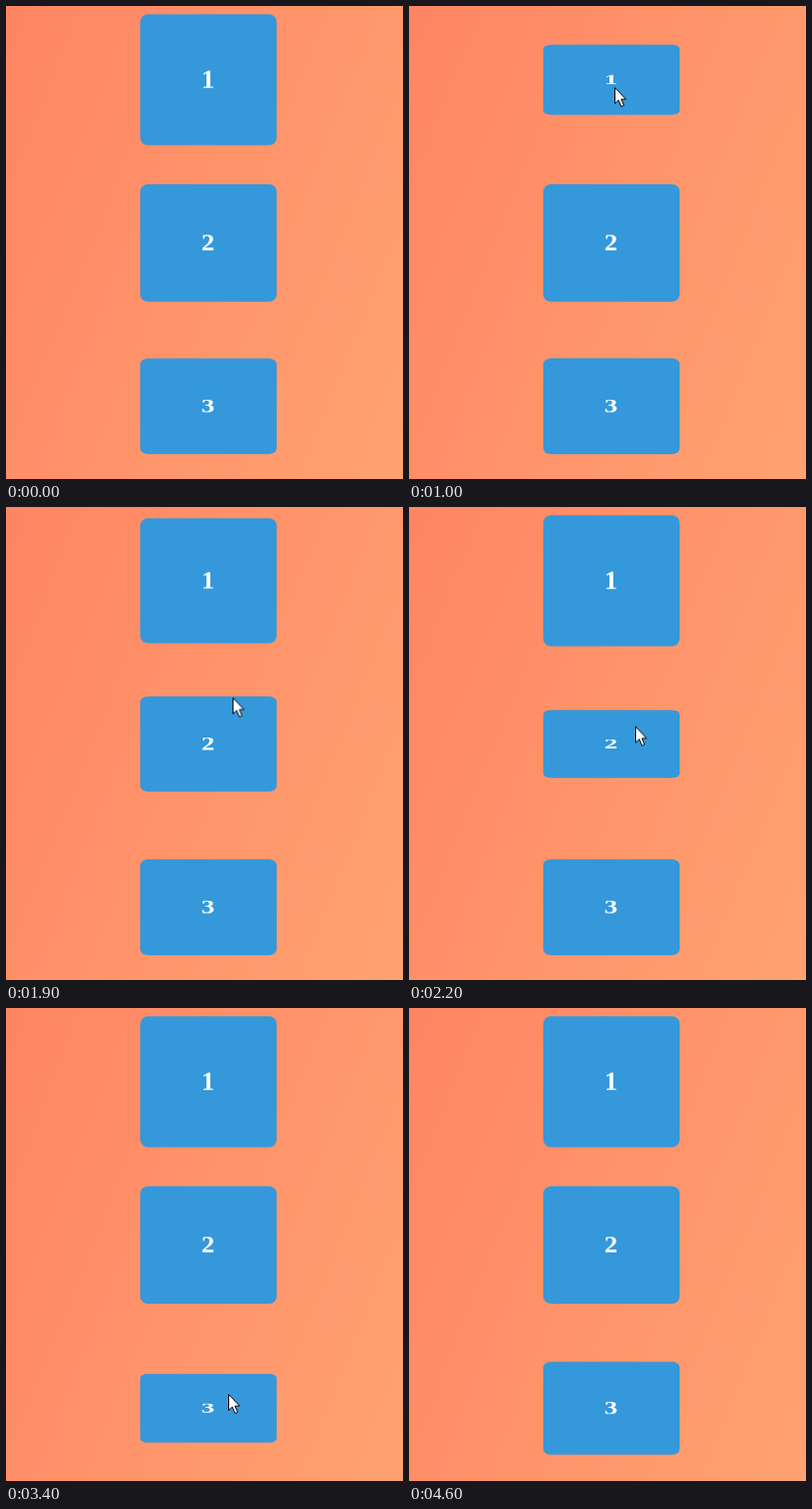
These frames come from a looping animation (402x478 px, 4700 ms). An HTML page:

```html
<!DOCTYPE html>
<html lang="en">
<head>
<meta charset="utf-8">
<title>Tilting cards</title>
<style>
  html, body {
    margin: 0;
    width: 100%;
    height: 100%;
    overflow: hidden;
  }
  body {
    position: relative;
    background: linear-gradient(112deg, #ff8563, #ffa271);
  }
  .card {
    position: absolute;
    left: 136px;
    top: calc(5.5px + 165px * var(--i));
    width: 138px;
    height: 137px;
    border-radius: 8px;
    background: #3498db;
    color: #fff;
    font: bold 27px/137px "Liberation Serif", serif;
    text-align: center;
    text-indent: -1px;
  }
  #pointer {
    position: absolute;
    left: 0;
    top: 0;
    overflow: visible;
  }
</style>
</head>
<body>
<div class="card" style="--i: 0">1</div>
<div class="card" style="--i: 1">2</div>
<div class="card" style="--i: 2">3</div>
<svg id="pointer" width="14" height="22">
  <path d="M.5 .5V16.6L4.2 13.2L6.9 19.6L9.6 18.4L6.9 12.2H11.6Z" fill="#fff" stroke="#000" stroke-linejoin="round"/>
</svg>
<script>
const LOOP = 4700;
const STEP = 100; // the picture advances ten times a second
const TILT = 400; // length of a hover transition
const HOVER_ANGLE = 60;

const animations = [];

function loop(element, keyframes, delay = 0) {
  const animation = element.animate(keyframes, { duration: LOOP, iterations: Infinity, delay });
  animation.pause();
  animations.push(animation);
}

const at = (time, props) => ({ offset: time / LOOP, ...props });
const tilt = angle => ({ transform: `rotateX(${angle}deg)`, easing: "ease" });

function hover(card, rest, enter, leave) {
  const stay = leave - enter;
  // The cycle begins on entering, so a return may run past the loop's end.
  loop(card, [
    at(0, tilt(rest)),
    at(TILT, tilt(HOVER_ANGLE)),
    at(stay, tilt(HOVER_ANGLE)),
    at(stay + TILT, tilt(rest)),
    at(LOOP, tilt(rest)),
  ], enter - LOOP);
}

const [first, second, third] = document.querySelectorAll(".card");
hover(first, 15, 680, 1690);
hover(second, 30, 1780, 2945);
hover(third, 45, 3090, 4360);

// Each easing leads on to the next key point.
const pointer = document.getElementById("pointer");
const move = (time, x, y, easing = "linear") =>
  at(time, { transform: `translate(${x}px, ${y}px)`, easing });
loop(pointer, [
  move(0, 328, 104),
  move(600, 328, 104, "ease-out"),
  move(1000, 208, 82),
  move(1200, 208, 82, "ease-in"),
  move(1700, 230, 144.5, "ease-out"),
  move(2150, 229, 221.5),
  move(2750, 229, 221.5, "ease-in"),
  move(3000, 225, 321.5, "ease-out"),
  move(3400, 225, 390),
  move(4000, 225, 390, "ease-in"),
  move(4350, 260, 398),
  move(LOOP, 260, 398),
]);

const show = (time, opacity) => at(time, { opacity, easing: "step-end" });
loop(pointer, [show(0, 0), show(600, 1), show(4350, 0), show(LOOP, 0)]);

const start = performance.now();

function render() {
  const elapsed = (performance.now() - start) % LOOP;
  const time = Math.floor(elapsed / STEP) * STEP;
  for (const animation of animations) animation.currentTime = time;
  requestAnimationFrame(render);
}
render();
</script>
</body>
</html>
```
